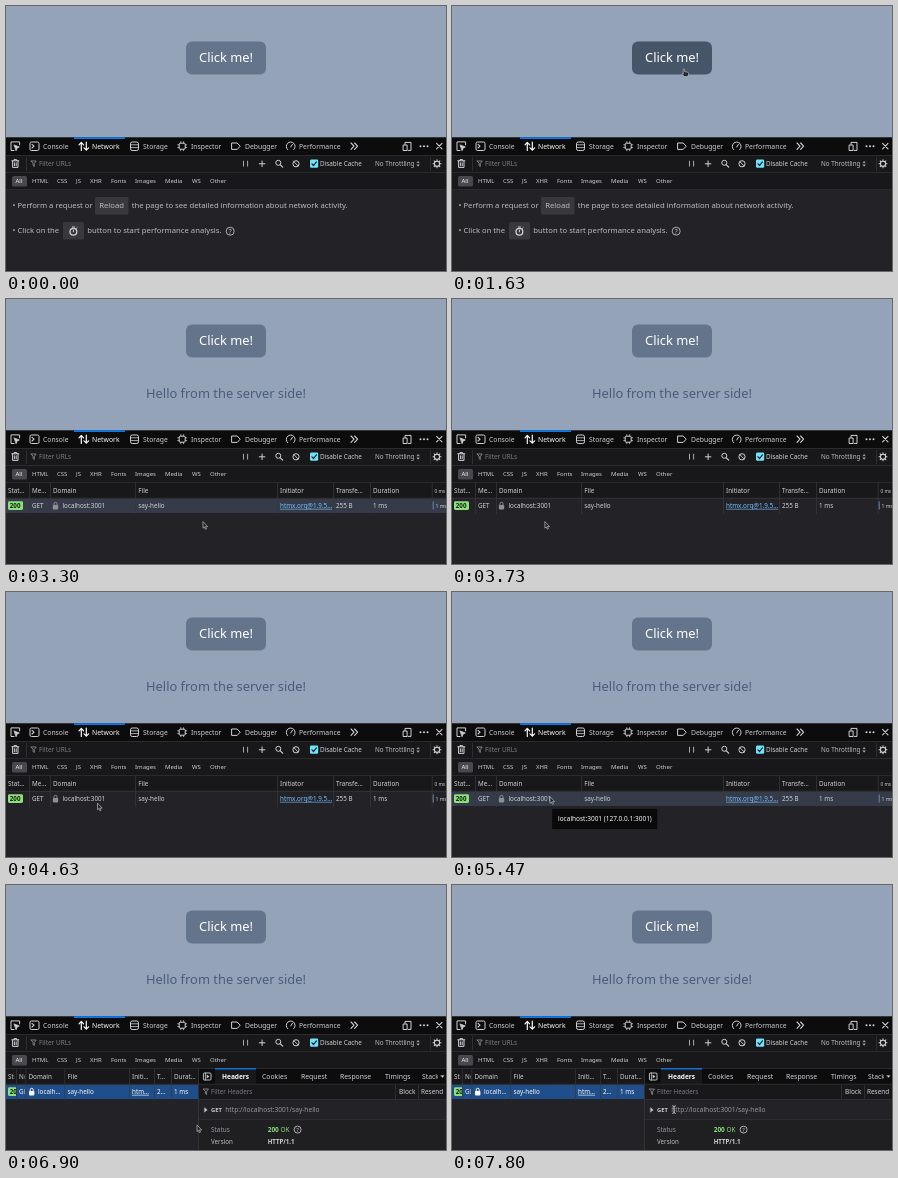
An HTML page for the animation above (8000 ms loop, 440 by 265 pixels).

```html
<!DOCTYPE html>
<html lang="en">
<head>
<meta charset="utf-8">
<title>Network panel demo</title>
<style>
  html, body { margin: 0; width: 100%; height: 100%; overflow: hidden; background: #232327; }
  svg { display: block; }
  text { font-family: "Noto Sans", "Open Sans", sans-serif; white-space: pre; }
</style>
</head>
<body>
<svg id="stage" width="100%" height="100%" viewBox="0 0 440 265"></svg>
<script>
const LOOP = 8000;
const DIM = '#98989d', FAINT = '#7d7d82', NOTE = '#bdbdc1', SOFT = '#d0d0d4', WHITE = '#f9f9fa';
const LINE = '#38383d', BAR = '#18181a', BLUE = '#0a84ff';

const text = (x, y, size, str, fill = SOFT, extra = '') =>
  `<text x="${x}" y="${y}" font-size="${size}" fill="${fill}" ${extra}>${str}</text>`;
const rect = (x, y, w, h, fill, extra = '') =>
  `<rect x="${x}" y="${y}" width="${w}" height="${h}" fill="${fill}" ${extra}/>`;
const path = (d, stroke = SOFT, width = 1, fill = 'none') =>
  `<path d="${d}" stroke="${stroke}" stroke-width="${width}" fill="${fill}" stroke-linecap="round" stroke-linejoin="round"/>`;
const circle = (x, y, r, stroke = SOFT, width = 1, fill = 'none') =>
  `<circle cx="${x}" cy="${y}" r="${r}" stroke="${stroke}" stroke-width="${width}" fill="${fill}"/>`;
const clip = (x, y, w, h, body) =>
  `<svg x="${x}" y="${y}" width="${w}" height="${h}" viewBox="${x} ${y} ${w} ${h}">${body}</svg>`;
const group = (id, body) => `<g id="${id}">${body}</g>`;
const BOLD = 'font-weight="600"', MEDIUM = 'font-weight="500"', MID = 'text-anchor="middle"';

const funnel = (x, y) => path(`M${x} ${y}h5l-1.9 2.5v3l-1.2-.9v-2.1z`, DIM, 0.8);
const help = (x, y, r) => circle(x, y, r, SOFT, 0.8) + text(x, y + r * 0.6, r * 1.65, '?', SOFT, MID);
const lock = (x, fill) => rect(x, 206, 5.4, 4.4, fill, 'rx="0.8"') +
  path(`M${x + 1.2} 206v-1.2a1.5 1.5 0 0 1 3 0v1.2`, fill, 1);

function page() {
  return rect(0, 0, 440, 131.5, '#94a3b8') +
    group('button', rect(180, 0, 80, 33, '#64748b', 'id="face" rx="6"') +
      text(220, 20.9, 12.9, 'Click me!', '#fff', MID)) +
    group('hello', text(220, 99.1, 12.9, 'Hello from the server side!', '#4b5c7a', MID));
}

function toolbar() {
  const tabs = [[37, 'Console'], [137, 'Storage'], [185, 'Inspector'], [239, 'Debugger'], [293, 'Performance']];
  const icons =
    path('M8 144.5H5v-8.6h8.6v3', SOFT) + path('M8.3 139l5 2-2.2 1-.9 2.4z', SOFT, 0.8, SOFT) +
    rect(24, 136, 9, 8.5, 'none', `rx="1.4" stroke="${SOFT}"`) + path('M26 138.4l2 1.8-2 1.8', SOFT, 1.1) +
    path('M75.3 144.5v-8M73 138.8l2.3-2.4 2.3 2.4M80.3 136v8M78 141.8l2.3 2.4 2.3-2.4', WHITE, 1.2) +
    rect(124.5, 136, 8, 8.5, 'none', `rx="1.8" stroke="${SOFT}"`) + path('M124.5 138.8h8M124.5 141.6h8', SOFT, 0.8) +
    rect(173.2, 137.2, 6, 6, 'none', `rx="1" stroke="${SOFT}"`) +
    path('M174.8 137v-1.3M177.6 137v-1.3M174.8 143.4v1.3M177.6 143.4v1.3M173 138.8h-1.3M173 141.6h-1.3M179.4 138.8h1.3M179.4 141.6h1.3', SOFT, 0.8) +
    path('M226 137h5.2l3 3.2-3 3.2H226z') +
    path('M281.6 143.6a4.4 4.4 0 1 1 6.2 0M284.7 141l1.8-2.8') +
    path('M345 137l3 3.2-3 3.2M348.6 137l3 3.2-3 3.2', SOFT, 1.1) +
    path('M399 138.4v-2h6v8h-2.8M397.5 139h3.6v5.5h-3.6z') +
    [414.5, 418, 421.5].map(x => circle(x, 140.2, 1, 'none', 0, SOFT)).join('') +
    path('M430.6 137.4l5.4 5.4M436 137.4l-5.4 5.4', SOFT, 1.1);
  return rect(0, 131.5, 440, 17.5, '#0c0c0d') + rect(68, 131.3, 51, 1.6, BLUE) + icons +
    tabs.map(([x, s]) => text(x, 142.6, 6.8, s)).join('') +
    text(86, 142.6, 6.85, 'Network', WHITE, MEDIUM);
}

function filters() {
  const gear = Array.from({ length: 8 }, (_, i) => {
    const a = i * Math.PI / 4, c = Math.cos(a), s = Math.sin(a);
    return `M${431 + c * 2.9} ${157.8 + s * 2.9}L${431 + c * 4} ${157.8 + s * 4}`;
  }).join('');
  const types = [[26, 'HTML'], [51, 'CSS'], [70, 'JS'], [84, 'XHR'], [105, 'Fonts'],
    [129, 'Images'], [159, 'Media'], [186, 'WS'], [204, 'Other']];
  return rect(0, 149, 440, 35, BAR) + rect(0, 149, 440, 0.6, LINE) + rect(0, 166, 440, 0.6, LINE) +
    rect(20, 151, 0.7, 14, LINE) +
    path('M5.8 154.8h7M8 154.6v-1h2.6v1M6.6 155v6.4h5.4V155M8.4 156.8v3M10.2 156.8v3', SOFT, 1) +
    funnel(25.2, 155) + text(33, 160.1, 6.45, 'Filter URLs', FAINT) +
    path('M237.5 155.2v5M241.6 155.2v5', SOFT, 0.8) +
    path('M253.3 157.8h5.6M256.1 155v5.6', SOFT, 1) +
    circle(272.3, 156.8, 2.5) + path('M274.3 158.8l2.4 2.4', SOFT, 1.2) +
    circle(290, 157.8, 3.1) + path('M287.9 155.7l4.2 4.2', SOFT, 0.9) +
    rect(304, 153.6, 8.2, 8.2, '#6fe3fb', 'rx="1.4"') + path('M306 157.8l1.6 1.7 2.8-3.6', '#18181a', 1.2) +
    text(314, 160, 6.35, 'Disable Cache') + text(369, 160, 6.3, 'No Throttling', NOTE) +
    path('M410.8 156.8l1.3-1.6 1.3 1.6zM410.8 158.8l1.3 1.6 1.3-1.6z', NOTE, 0.2, NOTE) +
    rect(424, 151, 0.7, 14, LINE) + circle(431, 157.8, 2.6, SOFT, 1.1) + path(gear, SOFT, 1.1) +
    rect(6, 170, 15, 10.6, '#48484d', 'rx="1.6"') + text(9.5, 177.2, 6, 'All', WHITE, MEDIUM) +
    types.map(([x, s]) => text(x, 177.1, 6, s, SOFT, MEDIUM)).join('');
}

function intro() {
  return rect(0, 183.4, 440, 0.6, LINE) +
    text(6.5, 202.2, 7.7, '•', NOTE) + text(11.5, 202.2, 7.65, 'Perform a request or', NOTE) +
    rect(89, 191, 33.5, 17.6, LINE, 'rx="1.6"') + text(93.2, 202.2, 7.7, 'Reload', NOTE) +
    text(125.7, 202.2, 7.7, 'the page to see detailed information about network activity.', NOTE) +
    text(6.5, 227.2, 7.7, '•', NOTE) + text(11.5, 227.2, 7.65, 'Click on the', NOTE) +
    rect(57, 216, 21, 17.6, LINE, 'rx="1.6"') +
    circle(67.4, 225.8, 3.4, SOFT, 1.3) + path('M67.4 225.8v-1.8M66.3 221h2.2M70.4 222.4l.7-.7', SOFT, 1) +
    text(81.3, 227.2, 7.7, 'button to start performance analysis.', NOTE) + help(224.2, 225.2, 4);
}

const badge = w => clip(2, 201, w, 12, rect(2, 202.2, 15, 8.8, '#8be07a', 'rx="1.4"') +
  text(3.8, 209, 6.2, '200', '#142010', BOLD));

// Each column: left edge, width, heading, cell text, cell colour
function table(width, cols) {
  const cells = cols.map(([x, w, head, cell, fill = SOFT, extra = '']) =>
    clip(x, 184, w, 31, text(x, 193.8, 6.3, head) + text(x + (head === 'Domain' ? 9.5 : 0), 208.8, 6.3, cell, fill, extra))).join('');
  const rules = cols.slice(1).map(([x]) => rect(x - 3, 184, 0.7, 31, LINE)).join('');
  return rect(0, 184, width, 15, BAR) + rect(0, 183.4, width, 0.6, LINE) + rect(0, 198.8, width, 0.8, LINE) + rules + cells;
}

function wide() {
  return table(440, [[2, 19, 'Stat…', ''], [26, 15, 'Me…', 'GET'], [47, 80, 'Domain', 'localhost:3001'],
    [132.3, 100, 'File', 'say-hello'],
    [274, 52, 'Initiator', 'htmx.org@1.9.5…', '#75bfff', 'text-decoration="underline"'],
    [330, 33, 'Transfe…', '255 B'], [367, 50, 'Duration', '1 ms']]) +
    rect(425.8, 184, 0.7, 31, LINE) + text(428.5, 193.6, 4.7, '0 ms') +
    rect(426.7, 202.5, 1, 8, '#6b89b7') + text(429.5, 208.6, 5, '1 ms') +
    badge(15.2) + lock(46.8, '#8f8f94');
}

function narrow() {
  return rect(0, 200, 192, 14, '#204e8a') +
    table(192, [[2, 6.2, 'Stat', ''], [13, 5.6, 'Ne', 'GET', WHITE], [22.5, 35, 'Domain', 'localh…', WHITE],
      [61.5, 60, 'File', 'say-hello', WHITE],
      [126, 21, 'Initi…', 'htm…', WHITE, 'text-decoration="underline"'],
      [151, 13, 'T…', '2…', WHITE], [168, 24, 'Durat…', '1 ms', WHITE]]) +
    badge(8) + lock(23, WHITE);
}

function details() {
  const tabs = [[256, 'Cookies'], [295, 'Request'], [334, 'Response'], [379, 'Timings']];
  return rect(192, 184, 248, 81, '#232327') + rect(192, 184, 248, 15, '#0c0c0d') +
    rect(192, 183.4, 248, 0.6, LINE) + rect(209, 184, 41, 15, BAR) + rect(209, 183.2, 41, 1.2, BLUE) +
    rect(197.4, 188, 7.6, 7, 'none', `rx="1" stroke="${SOFT}" stroke-width="0.9"`) +
    path('M199.4 188v7', SOFT, 0.8) + path('M201 190l2.2 1.5-2.2 1.5z', SOFT, 0.4, SOFT) +
    text(216, 193.5, 6.55, 'Headers', WHITE, BOLD) +
    tabs.map(([x, s]) => text(x, 193.5, 6.85, s)).join('') +
    clip(416, 185, 15.8, 14, text(416, 193.5, 6.8, 'Stack Trace')) +
    path('M434.8 190.6h3.4l-1.7 1.9z', SOFT, 0.3, SOFT) +
    rect(192, 199, 248, 15.4, BAR) + rect(192, 198.8, 248, 0.6, LINE) + rect(192, 214.2, 248, 0.6, LINE) +
    group('fields', funnel(197.5, 204) + text(205, 208.8, 6.3, 'Filter Headers', FAINT) +
      rect(389, 200, 0.7, 14, LINE) + rect(412, 200, 0.7, 14, LINE) +
      text(393, 208.8, 6.5, 'Block') + text(415, 208.8, 6.4, 'Resend') +
      path('M198.6 222.8l2.6 2.1-2.6 2.1z', SOFT, 0.4, SOFT) + text(205, 227, 5.8, 'GET', SOFT, BOLD) +
      text(219.3, 227, 6.6, 'http://localhost:3001/say-hello', DIM) +
      rect(192, 234, 248, 31, '#1f1f22') + rect(192, 234, 248, 0.6, LINE) +
      text(205, 246.8, 6.4, 'Status', DIM) + help(291.6, 244.6, 3.5) +
      text(261.7, 246.8, 6.5, '200 <tspan font-weight="500">OK</tspan>', '#86de74', BOLD) +
      text(205, 259.4, 6.2, 'Version', NOTE) + text(261.7, 259.4, 6.1, 'HTTP/1.1', SOFT, BOLD)) +
    rect(192, 184, 0.8, 81, LINE);
}

const tooltip = () => rect(99.8, 216.3, 106, 21.4, '#09090a', 'stroke="#2c2c30" stroke-width="0.6"') +
  text(106, 229.2, 6.5, 'localhost:3001 (127.0.0.1:3001)', WHITE, MEDIUM);

const cursor = () =>
  group('arrow', path('M0 0v6.2l1.4-1.2 1 2.3 1.1-.5-1-2.2h1.8z', '#b8b8be', 0.7, '#26262a')) +
  group('hand', path('M-.8 4V.2q.7-.9 1.4 0v2.4l3.2.7q.9.3.8 1.2l-.6 3.1H.4L-2.2 5q.3-1 1.4-.3z', '#b8bec8', 0.7, '#26262a')) +
  group('beam', path('M-1.4-3.8q1.4 0 1.4 1v5.6q0 1-1.4 1M1.4-3.8q-1.4 0-1.4 1M1.4 3.8q-1.4 0-1.4-1', '#d4d4d8', 0.9));

document.getElementById('stage').innerHTML = rect(0, 0, 440, 265, '#232327') + page() + toolbar() + filters() +
  group('intro', intro()) + group('hover', rect(0, 200, 440, 14, '#353b48')) + group('wide', wide()) +
  group('narrow', narrow()) + group('details', details()) + group('tooltip', tooltip()) + group('cursor', cursor());

const el = id => document.getElementById(id);
const show = (id, on) => el(id).setAttribute('display', on ? 'inline' : 'none');
const clamp = v => Math.max(0, Math.min(1, v));
const ease = v => v * v * (3 - 2 * v);

// Pointer track: time, x, y
const track = [[770, 22, 190], [850, 150, 45], [900, 225, 3], [930, 242, 8], [1130, 242, 8], [1630, 232, 63],
  [3100, 232, 63], [3300, 197, 223], [3450, 160, 245], [3770, 90, 222], [4300, 90, 222], [4630, 91.5, 211.5],
  [4930, 98, 205], [6600, 98, 205], [6900, 191, 240.3], [7400, 222, 224.6]];

function pointer(t) {
  let i = track.findIndex(k => k[0] > t);
  if (i < 0) i = track.length;
  const a = track[Math.max(0, i - 1)], b = track[Math.min(i, track.length - 1)];
  const u = b[0] > a[0] ? ease(clamp((t - a[0]) / (b[0] - a[0]))) : 1;
  return [a[1] + (b[1] - a[1]) * u, a[2] + (b[2] - a[2]) * u];
}

function update(t) {
  const sent = t >= 2230, swapped = t >= 2300, opened = t >= 6000;
  const dark = clamp((t - 1380) / 150) - clamp((t - 2400) / 150);
  const mix = (a, b) => Math.round(a + (b - a) * dark);
  el('face').setAttribute('fill', `rgb(${mix(100, 71)},${mix(116, 85)},${mix(139, 105)})`);
  el('button').setAttribute('transform', `translate(0 ${swapped ? 25.4 : 35.4})`);
  show('hello', swapped);
  show('intro', !sent);
  show('wide', sent && !opened);
  show('hover', (t >= 3240 && t < 3330) || (t >= 4660 && !opened));
  show('narrow', opened);
  show('details', opened);
  show('fields', t >= 6100);
  show('tooltip', t >= 5470 && !opened);

  const [x, y] = pointer(t);
  const hand = t >= 1380 && t < 2400, beam = t >= 7380;
  el('cursor').setAttribute('transform', `translate(${x.toFixed(2)} ${y.toFixed(2)})`);
  show('cursor', t >= 770);
  show('hand', hand);
  show('beam', beam);
  show('arrow', !hand && !beam);
}

const start = performance.now();
function tick() {
  update((performance.now() - start) % LOOP);
  requestAnimationFrame(tick);
}
update(0);
requestAnimationFrame(tick);
</script>
</body>
</html>
```
